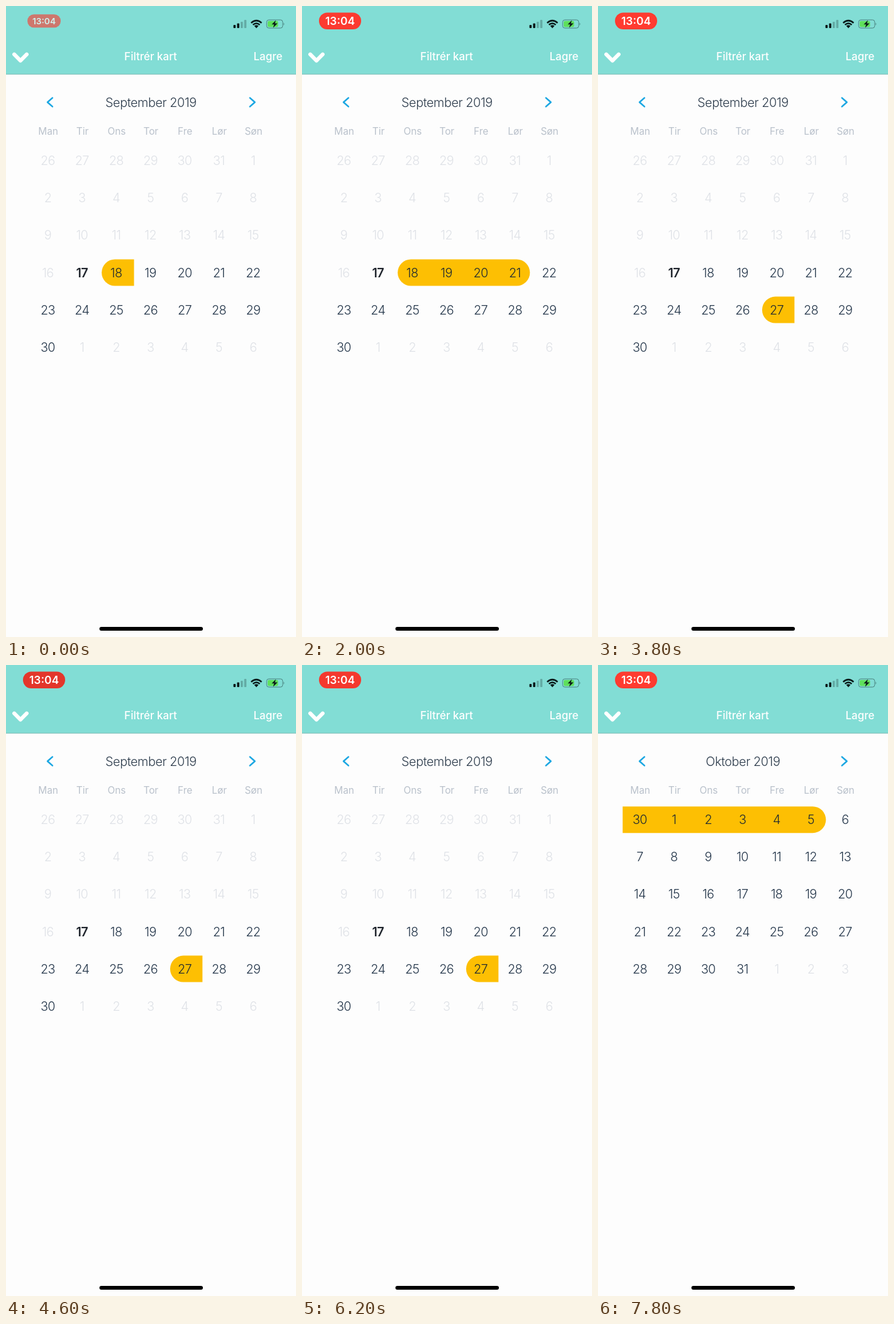
Write an HTML page that moves like this. It is 461 by 1000 pixels and loops after 8000 ms.

```html
<!DOCTYPE html>
<html lang="no">
<head>
<meta charset="utf-8">
<title>Calendar range picker</title>
<style>
html, body { margin: 0; width: 100%; height: 100%; overflow: hidden; background: #fdfdfd; }
svg { display: block; width: 461px; height: 1000px; }
text { font-family: Inter, sans-serif; text-anchor: middle; }
.bar { font-size: 17px; font-weight: 500; fill: #fff; }
.title { font-size: 19.8px; font-weight: 300; fill: #2d3c4c; letter-spacing: -.4px; }
.week { font-size: 15.4px; fill: #b9c1cb; }
.day { font-size: 19.8px; font-weight: 300; fill: #24364a; letter-spacing: -.6px; }
.off { fill: #dfe2e7; }
.today { font-weight: 600; fill: #20252d; }
.picked { fill: #222b30; }
.line { fill: none; stroke-linecap: round; stroke-linejoin: round; }
</style>
</head>
<body>
<svg id="stage" viewBox="0 0 461 1000">
  <rect width="461" height="1000" fill="#fdfdfd"/>
  <rect width="461" height="108" fill="#82ddd5"/>
  <rect y="107.6" width="461" height="1" fill="#79b9b4"/>

  <g id="pill">
    <rect id="pillBox" x="27" y="10.5" width="67" height="26.5" rx="13.2"/>
    <text x="60.5" y="30" font-size="17.4" font-weight="600" fill="#fff">13:04</text>
  </g>

  <g fill="#0b1a1a">
    <rect x="361.5" y="30" width="3.6" height="5" rx="1"/>
    <rect x="367.3" y="27.5" width="3.6" height="7.5" rx="1"/>
    <g opacity=".25">
      <rect x="373" y="25" width="3.6" height="10" rx="1"/>
      <rect x="378.6" y="22" width="3.6" height="13" rx="1"/>
    </g>
    <path d="M398 35.2L394.6 31.6Q398 28.8 401.4 31.6Z"/>
  </g>
  <g class="line" stroke="#0b1a1a" stroke-width="2.5" style="stroke-linecap:butt">
    <path d="M392.6 29.9Q398 25.2 403.4 29.9"/>
    <path d="M389.7 26.9Q398 19.3 406.3 26.9"/>
  </g>
  <rect x="414.3" y="22" width="25.6" height="13" rx="3.6" fill="none" stroke="#4b8480"/>
  <path d="M441.3 26.2q2 2.3 0 4.6z" fill="#4b8480"/>
  <rect x="416" y="23.7" width="16.5" height="9.6" rx="2" fill="#5fe05c"/>
  <path d="M429 22.6L422.4 29.3H426.2L424.6 34.4L431.6 27.4H427.5Z" fill="#0b1a1a"/>

  <path class="line" d="M13.1 76.6L23 86.6L32.9 76.6" stroke="#fff" stroke-width="6"/>
  <text class="bar" x="230" y="86">Filtrér kart</text>
  <text class="bar" x="416.5" y="86">Lagre</text>

  <g class="line" stroke="#1ca7e2" stroke-width="2.6">
    <path d="M73.8 145.6L66 152.5L73.8 159.4"/>
    <path d="M387.8 145.6L395.6 152.5L387.8 159.4"/>
  </g>
  <g id="weekdays"></g>
  <g id="views"></g>
  <rect x="148.5" y="984" width="164.5" height="6" rx="3" fill="#000"/>
</svg>
<script>
const LOOP = 8000;
const $ = id => document.getElementById(id);
const colX = c => 66.7 + 54.4 * c;
const rowY = r => 245 + 59.1 * r;

const label = (cls, x, y, str) => `<text class="${cls}" x="${x}" y="${y}">${str}</text>`;

// Yellow band over columns a..b; caps are round at the chosen ends.
function band(row, a, b, roundL, roundR) {
  const y = rowY(row) - 20.8, r = 21;
  const x0 = colX(a) - (roundL ? 23.4 : 27.5);
  const x1 = colX(b) + (roundR ? 23.6 : 28);
  const right = roundR ? `H${x1 - r}a${r} ${r} 0 0 1 0 42` : `H${x1}v42`;
  const left = roundL ? `H${x0 + r}a${r} ${r} 0 0 1 0 -42` : `H${x0}`;
  return `<path fill="#fdbf03" d="M${roundL ? x0 + r : x0} ${y}${right}${left}Z"/>`;
}

// first: leading days of the previous month, from: first selectable cell.
function month({ title, first, prevDays, days, rows, from, today }, pick) {
  let out = label('title', 230.4, 159.5, title);
  if (pick) out += band(...pick);
  for (let i = 0; i < rows * 7; i++) {
    const row = Math.floor(i / 7), col = i % 7, n = i - first + 1;
    const num = n < 1 ? prevDays + n : n > days ? n - days : n;
    const picked = pick && row === pick[0] && col >= pick[1] && col <= pick[2];
    const off = i < from || n >= days + 1;
    const cls = picked ? 'picked' : off ? 'off' : n === today ? 'today' : '';
    out += label('day ' + cls, colX(col) - .3, rowY(row) + 7.2, num);
  }
  return out;
}

const sept = { title: 'September 2019', first: 6, prevDays: 31, days: 30, rows: 6, from: 22, today: 17 };
const okt = { title: 'Oktober 2019', first: 1, prevDays: 30, days: 31, rows: 5, from: 0 };

const steps = [
  [0, month(sept, [3, 2, 2, true, false])],
  [2000, month(sept, [3, 2, 5, true, true])],
  [3400, month(sept, [4, 4, 4, true, false])],
  [6800, month(okt)],
  [7400, month(okt, [0, 0, 5, false, true])]
];

$('weekdays').innerHTML = ['Man', 'Tir', 'Ons', 'Tor', 'Fre', 'Lør', 'Søn']
  .map((d, c) => label('week', colX(c) + .4, 203.5, d)).join('');
$('views').innerHTML = steps.map(s => `<g>${s[1]}</g>`).join('');
const views = [...$('views').children];

function draw(t) {
  const now = steps.filter(s => s[0] <= t).length - 1;
  views.forEach((v, i) => v.style.display = i === now ? '' : 'none');

  // The pill pops in, then its red breathes every two seconds.
  const grow = Math.min(1, t / 200);
  const glow = .5 + .5 * Math.cos((t - 3800) / 1000 * Math.PI);
  const s = .79 + .21 * grow;
  $('pill').setAttribute('transform', `translate(60.5 23.8) scale(${s}) translate(-60.5 -23.8)`);
  $('pill').setAttribute('opacity', .62 + .38 * grow);
  $('pillBox').setAttribute('fill', `rgb(${224 + 31 * glow}, ${53 + 6 * glow}, ${43 + 5 * glow})`);
}

const begin = performance.now();
function tick() {
  draw((performance.now() - begin) % LOOP);
  requestAnimationFrame(tick);
}
draw(0);
tick();
</script>
</body>
</html>
```
